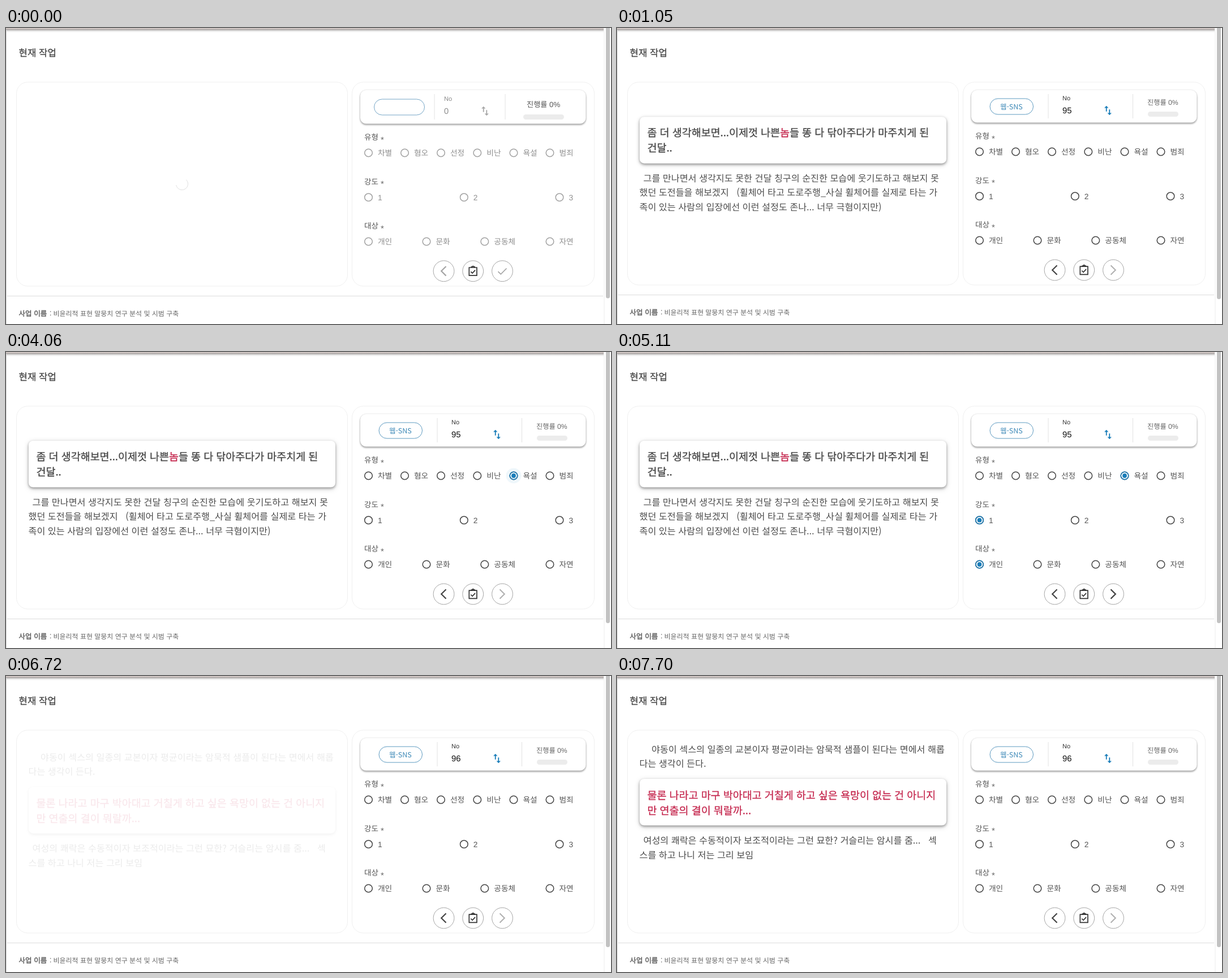
An HTML page that plays this animation: 1069x524 px, repeating every 8 s.

```html
<!DOCTYPE html>
<html lang="ko">
<head>
<meta charset="utf-8">
<title>현재 작업</title>
<style>
  html, body { margin: 0; width: 100%; height: 100%; overflow: hidden; background: #fff; }
  svg { display: block; width: 1069px; height: 524px; }
  text { font-family: "Liberation Sans", "Noto Sans CJK KR", "Noto Sans CJK", sans-serif; white-space: pre; text-rendering: geometricPrecision; }
  .kr { font-family: "Noto Sans CJK KR", "Noto Sans CJK", sans-serif; }
  .medium { stroke: currentColor; stroke-width: .32px; }
  .line { fill: none; stroke-linejoin: miter; }
  .card { fill: #fff; filter: drop-shadow(0 2px 1.5px rgba(0,0,0,.34)) drop-shadow(0 0 1px rgba(0,0,0,.16)); }
  .quote { fill: #fff; filter: drop-shadow(0 2.5px 2px rgba(0,0,0,.34)) drop-shadow(0 2px 4px rgba(0,0,0,.18)); }

  .busy, .ready, .first, .second, .held, .hover, .pick1, .pick2, .pick3 {
    animation: 8s step-end infinite;
  }
  .busy { animation-name: busy; }
  .ready { animation-name: ready; }
  .first { animation-name: first; }
  .second { animation-name: second; }
  .held { animation-name: held; }
  .hover { animation-name: hover; }
  .pick1 { animation-name: pick1; }
  .pick2 { animation-name: pick2; }
  .pick3 { animation-name: pick3; }
  .rise1 { animation: rise1 8s linear infinite; }
  .rise2 { animation: rise2 8s linear infinite; }
  .ripple1, .ripple2, .ripple3 { transform-box: fill-box; transform-origin: center; fill: #eff7fb; }
  .ripple1 { animation: ripple1 8s ease-out infinite; }
  .ripple2 { animation: ripple2 8s ease-out infinite; }
  .ripple3 { animation: ripple3 8s ease-out infinite; }
  .spin { transform-origin: 311px 276px; animation: spin 8s linear infinite; }

  @keyframes busy { 0% { opacity: 1 } 2.25% { opacity: 0 } 70.875% { opacity: 1 } 82.625%, 100% { opacity: 0 } }
  @keyframes ready { 0% { opacity: 0 } 2.25% { opacity: 1 } 70.875% { opacity: 0 } 82.625%, 100% { opacity: 1 } }
  @keyframes first { 0% { opacity: 1 } 75%, 100% { opacity: 0 } }
  @keyframes second { 0% { opacity: 0 } 75%, 100% { opacity: 1 } }
  @keyframes held { 0% { opacity: 0 } 60% { opacity: 1 } 77.5%, 100% { opacity: 0 } }
  @keyframes hover { 0% { opacity: 0 } 69.125% { opacity: 1 } 77.5%, 100% { opacity: 0 } }
  @keyframes pick1 { 0% { opacity: 0 } 48.125% { opacity: 1 } 77.5%, 100% { opacity: 0 } }
  @keyframes pick2 { 0% { opacity: 0 } 58.625% { opacity: 1 } 77.5%, 100% { opacity: 0 } }
  @keyframes pick3 { 0% { opacity: 0 } 63.875% { opacity: 1 } 77.5%, 100% { opacity: 0 } }
  @keyframes rise1 {
    0%, 2.25% { opacity: 0; transform: translateY(16px); animation-timing-function: ease }
    14.75%, 100% { opacity: 1; transform: none }
  }
  @keyframes rise2 {
    0%, 82.625% { opacity: 0; transform: translateY(16px); animation-timing-function: ease }
    95.125%, 100% { opacity: 1; transform: none }
  }
  @keyframes ripple1 {
    0%, 48.125% { opacity: 1; transform: scale(0) } 50%, 51.5% { opacity: 1; transform: none }
    54.25%, 100% { opacity: 0; transform: none }
  }
  @keyframes ripple2 {
    0%, 58.625% { opacity: 1; transform: scale(0) } 60.5%, 62% { opacity: 1; transform: none }
    64.75%, 100% { opacity: 0; transform: none }
  }
  @keyframes ripple3 {
    0%, 63.875% { opacity: 1; transform: scale(0) } 65.75%, 66.5% { opacity: 1; transform: none }
    68.25%, 100% { opacity: 0; transform: none }
  }
  @keyframes spin { to { transform: rotate(2057.14deg) } }
</style>
</head>
<body>
<svg id="stage" viewBox="0 0 1069 524"></svg>
<script>
const text = (x, y, size, color, str, cls = '') =>
  `<text x="${x}" y="${y}" class="${cls}" style="font-size:${size}px;color:${color}" fill="${color}">${str}</text>`;
const box = (x, y, w, h, r, attrs) =>
  `<rect x="${x}" y="${y}" width="${w}" height="${h}" rx="${r}" ${attrs}/>`;
const circle = (x, y, r, attrs) => `<circle cx="${x}" cy="${y}" r="${r}" ${attrs}/>`;
const path = (d, color, width, attrs = '') =>
  `<path class="line" d="${d}" stroke="${color}" stroke-width="${width}" ${attrs}/>`;
const group = (cls, ...parts) => `<g class="${cls}">${parts.join('')}</g>`;

const rows = [
  { name: '유형', y: 219, picked: 4, options: [[640.5, '차별'], [704.5, '혐오'], [768.5, '선정'], [832.8, '비난'], [897, '욕설'], [961, '범죄']] },
  { name: '강도', y: 297.7, picked: 0, options: [[640.5, '1'], [809.3, '2'], [978, '3']] },
  { name: '대상', y: 376, picked: 0, options: [[640.5, '개인'], [743, '문화'], [845.8, '공동체'], [961, '자연']] }
];

function radio(x, y, color) {
  return circle(x, y, 6.8, `fill="none" stroke="${color}" stroke-width="1.5"`);
}

function choices(busy) {
  const ink = busy ? '#a2a2a2' : '#444';
  const on = busy ? '#a2a2a2' : '#1a7db9';
  return rows.map((row, n) => {
    const y = row.y + (busy ? 2 : 0);
    const options = row.options.map(([x, label], i) => {
      const picked = i === row.picked;
      return (picked && !busy ? circle(x, y, 13.5, `class="ripple${n + 1}"`) : '') +
        radio(x, y, ink) +
        (picked ? group(busy ? 'held' : `pick${n + 1}`, radio(x, y, on), circle(x, y, 3.9, `fill="${on}"`)) : '') +
        text(x + 16.5, y + 5, 13.7, busy ? '#8f8f8f' : '#555', label);
    });
    return text(633, y - 23, 13.5, '#555', row.name) +
      text(662, y - 18.5, 15, '#666', '*') + options.join('');
  }).join('');
}

function buttons(busy) {
  const y = busy ? 430.3 : 428.5;
  const ring = x => circle(x, y, 18.4, 'fill="none" stroke="#a3a3a3"');
  const next = `M872.5 ${y - 8.3}l8.3 8.3-8.3 8.3`;
  const clip = `M818.3 ${y - 6.3}h13.6v14.2h-13.6z M822.3 ${y - 6.5}v-1h1.6a1.3 1.3 0 0 1 2.6 0h1.6v1 M821.3 ${y + 1}l2.8 2.8 5-5.4`;
  return circle(877, y, 18.4, 'class="hover" fill="#f3f3f3"') +
    [773.5, 825.2, 877].map(ring).join('') +
    path(`M777.5 ${y - 8.3}l-8.3 8.3 8.3 8.3`, busy ? '#a5a5a5' : '#444', 2.2) +
    path(clip, '#333', 1.7) +
    (busy
      ? path(`M869.5 ${y + .8}l4.8 4.8 10.2-10.4`, '#a5a5a5', 1.7)
      : path(next, '#b0b0b0', 2) + group('pick3', path(next, '#444', 2.2)));
}

function swap(x, y, color) {
  return `<path transform="translate(${x} ${y}) scale(.92) translate(-12 -12)" fill="${color}"
    d="M16 17V10h-2v7h-3l4 4 4-4zM9 3 5 7h3v7h2V7h3z"/>`;
}

function frame(busy) {
  const d = busy ? 2 : 0;
  const panel = (x, w) => box(x, 95.8, w, 359.2 + d, 20, 'fill="none" stroke="#efefef"');
  return panel(18.5, 585) + panel(611.5, 428) +
    path(`M2 ${472.5 + d}H1055`, '#dcdcdc', 1) +
    text(22.5, 508.3 + d, 12.6, '#555', '사업 이름', 'kr medium') +
    text(77, 508.3 + d, 12, '#666', ':', 'kr') +
    text(83.5, 508.3 + d, 11.98, '#666', '비윤리적 표현 말뭉치 연구 분석 및 시범 구축', 'kr') +
    box(1060, -6, 7, busy ? 484.5 : 486, 3.5, 'fill="#c2c2c2"') +
    box(626, 110, 398.5, 57.5 + d, 10, 'class="card"');
}

function busyView() {
  return group('busy', frame(true),
    box(650.5, 126, 89, 28, 14, 'fill="none" stroke="#74a5c6"'),
    path('M757 117V162M882 117V162', '#e2e2e2', 1),
    text(774, 129, 11, '#888', 'No'), group('held', text(774, 129, 11, '#444', 'No')),
    text(774, 152, 14.6, '#8d8d8d', '0'), swap(846.5, 147, '#a8a8a8'),
    text(920, 140.3, 13.2, '#555', '진행률 0%'),
    box(914, 153, 72, 9, 4.5, 'fill="#ececec"'),
    choices(true), buttons(true),
    group('spin', `<path class="line" d="M318.4 268.6A10.5 10.5 0 1 1 300.7 278.2" stroke="#dedede"/>`));
}

function readyView() {
  return group('ready', frame(false),
    box(659, 125, 76.5, 28, 14, 'fill="none" stroke="#5d9ac0"'),
    text(677, 143.7, 12.5, '#3f8ab8', '웹-SNS', 'kr'),
    path('M762 117V160M911.5 117V160', '#e2e2e2', 1),
    text(787, 128, 11, '#333', 'No'),
    group('first', text(787, 151, 14.8, '#111', '95')),
    group('second', text(787, 151, 14.8, '#111', '96')),
    swap(867.5, 146, '#1a7db9'),
    text(937, 135.9, 12.2, '#666', '진행률 0%'),
    box(938, 148, 54, 9, 4.5, 'fill="#ececec"'),
    choices(false), buttons(false),
    group('first', group('rise1', passage1())),
    group('second', group('rise2', passage2())));
}

const red = '#c52a50';
const body = (x, y, str) => text(x, y + 6, 16.22, '#4c4c4c', str, 'kr');
const strong = (y, color, str) => text(53.5, y + 7, 18.45, color, str, 'kr medium');
const quote = y => box(40, y, 542, 82.5, 8, 'class="quote"');

function passage1() {
  return quote(157) +
    strong(185, '#444', `좀 더 생각해보면...이제껏 나쁜<tspan fill="${red}" stroke="${red}">놈</tspan>들 똥 다 닦아주다가 마주치게 된`) +
    strong(212, '#444', '건달..') +
    body(46.5, 265.5, '그를 만나면서 생각지도 못한 건달 칭구의 순진한 모습에 웃기도하고 해보지 못') +
    body(39.5, 291, '했던 도전들을 해보겠지   (휠체어 타고 도로주행_사실 휠체어를 실제로 타는 가') +
    body(39.5, 316.5, '족이 있는 사람의 입장에선 이런 설정도 존나... 너무 극혐이지만)');
}

function passage2() {
  return body(61, 129.5, '야동이 섹스의 일종의 교본이자 평균이라는 암묵적 샘플이 된다는 면에서 해롭') +
    body(39.5, 155, '다는 생각이 든다.') +
    quote(182) +
    strong(210.5, red, '물론 나라고 마구 박아대고 거칠게 하고 싶은 욕망이 없는 건 아니지') +
    strong(237.5, red, '만 연출의 결이 뭐랄까...') +
    body(46.5, 291, '여성의 쾌락은 수동적이자 보조적이라는 그런 묘한? 거슬리는 암시를 줌...   섹') +
    body(39.5, 316.5, '스를 하고 나니 저는 그리 보임');
}

document.getElementById('stage').innerHTML =
  `<defs><linearGradient id="shade" x2="0" y2="1">
    <stop stop-color="#ddd3d0"/><stop offset=".16" stop-color="#d0c6c3"/>
    <stop offset=".32" stop-color="#aaa5a4"/><stop offset=".5" stop-color="#c9c7c6"/>
    <stop offset=".7" stop-color="#ececec"/><stop offset="1" stop-color="#fff"/>
  </linearGradient></defs>` +
  box(0, 0, 1056, 8, 0, 'fill="url(#shade)"') +
  path('M.5 3V524', '#d5d5d5', 1) + path('M1057 0V524', '#ececec', 1) +
  text(22.5, 49.5, 16.8, '#444', '현재 작업', 'kr medium') +
  busyView() + readyView();
</script>
</body>
</html>
```
